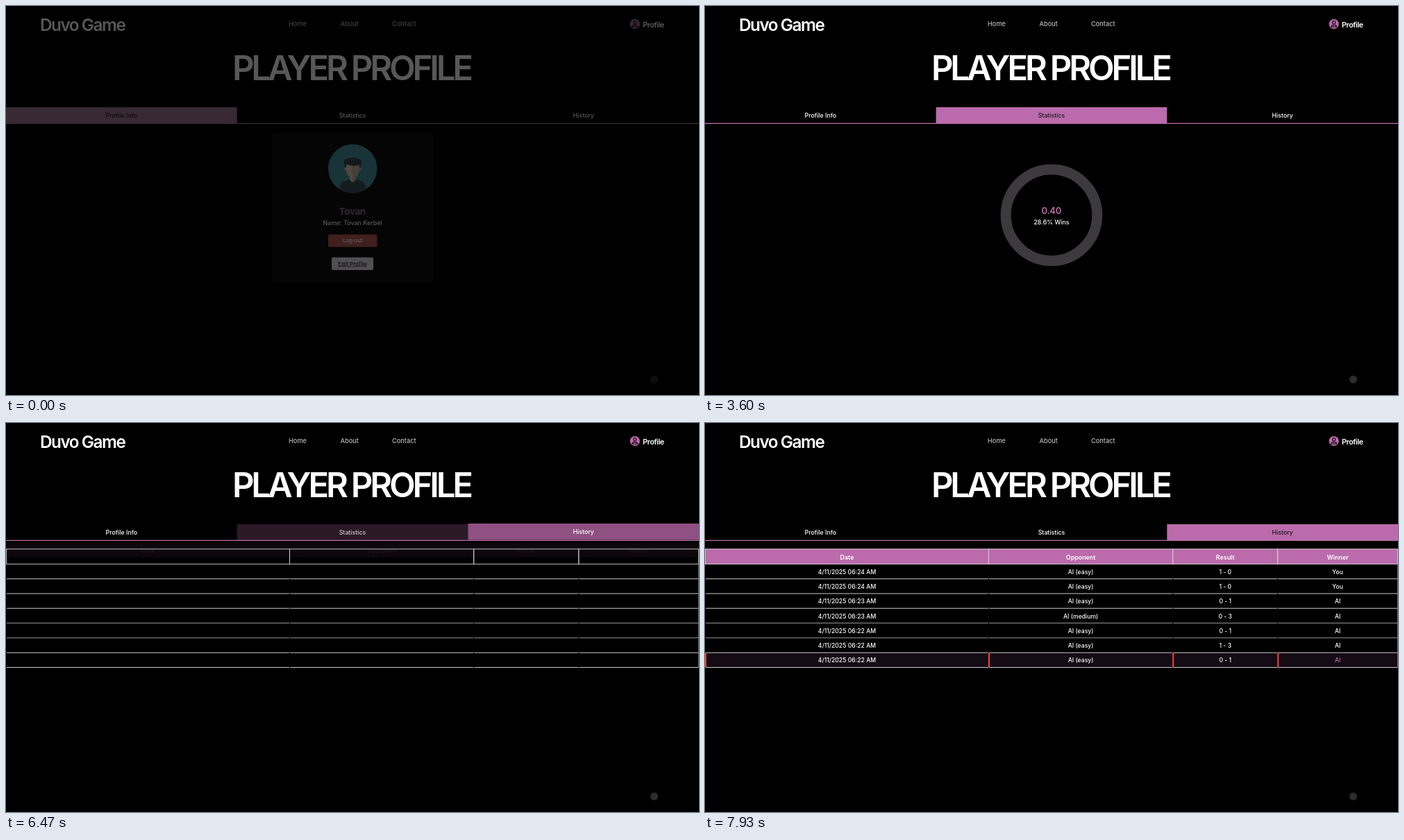
Recreate the animation shown at these times as an HTML page with a canvas. Size 998 by 561 pixels, loop 8 s.

```html
<!DOCTYPE html>
<html lang="en">
<head>
<meta charset="utf-8">
<title>Player profile</title>
<style>
html, body { margin: 0; width: 100%; height: 100%; overflow: hidden; background: #000; }
canvas { display: block; width: 998px; height: 561px; }
</style>
</head>
<body>
<canvas id="stage"></canvas>
<script>
const W = 998, H = 561, LOOP = 8000;
const PINK = '#bb6bab', RED = '#f54338', GREEN = '#4caf50', WHITE = '#fff';
const canvas = document.getElementById('stage');
const c = canvas.getContext('2d');
const dpr = window.devicePixelRatio || 1;
canvas.width = W * dpr;
canvas.height = H * dpr;

const STATS_AT = 2505, HISTORY_AT = 6262;
const TABS = ['Profile Info', 'Statistics', 'History'];
const COLS = [0.5, 408.5, 673.7, 824.8, 997.5];
const HEADS = ['Date', 'Opponent', 'Result', 'Winner'];
const GAMES = [
  ['24', 'easy', '1 - 0'], ['24', 'easy', '1 - 0'], ['23', 'easy', '0 - 1'],
  ['23', 'medium', '0 - 3'], ['22', 'easy', '0 - 1'], ['22', 'easy', '1 - 3'],
  ['22', 'easy', '0 - 1']
];
const TOP = 203.4, ROW = 21.3;

const clamp = x => Math.max(0, Math.min(1, x));
const ramp = (t, start, len) => clamp((t - start) / len);
const mix = (a, b, k) => a + (b - a) * k;
const out2 = p => 1 - (1 - p) * (1 - p);
const hold = (t, on, off, len) => Math.min(ramp(t, on, len), 1 - ramp(t, off, len));

// cubic-bezier(.25, .1, .25, 1)
function ease(x) {
  if (x <= 0 || x >= 1) return clamp(x);
  let lo = 0, hi = 1, u;
  for (let i = 0; i < 20; i++) {
    u = (lo + hi) / 2;
    const bx = 0.75 * u * (1 - u) + u * u * u;
    if (bx < x) lo = u; else hi = u;
  }
  return 0.3 * u * (1 - u) * (1 - u) + 3 * u * u * (1 - u) + u * u * u;
}

function text(s, x, y, size, o = {}) {
  c.font = `${o.weight || 500} ${size}px Inter, "Open Sans", sans-serif`;
  c.letterSpacing = (o.track || 0) * size + 'px';
  c.textAlign = o.align || 'center';
  c.fillStyle = o.color || WHITE;
  c.fillText(s, x, y + size * 0.364);
}

function box(x, y, w, h, color, r = 0) {
  c.fillStyle = color;
  c.beginPath();
  c.roundRect(x, y, w, h, r);
  c.fill();
}

function disc(x, y, r, color) {
  c.fillStyle = color;
  c.beginPath();
  c.arc(x, y, r, 0, Math.PI * 2);
  c.fill();
}

function shape(d, color) {
  c.fillStyle = color;
  c.fill(new Path2D(d));
}

function faded(alpha, dy, draw) {
  if (alpha <= 0) return;
  c.save();
  c.globalAlpha *= alpha;
  c.translate(0, dy);
  draw();
  c.restore();
}

function header() {
  text('Duvo Game', 49, 27.4, 24.3, { align: 'left', weight: 600, track: -0.06 });
  text('Home', 420, 25.5, 9.2, { color: '#b9b9b9' });
  text('About', 494.7, 25.5, 9.2, { color: '#b9b9b9' });
  text('Contact', 573.3, 25.5, 9.2, { color: '#b9b9b9' });
  disc(905.7, 26, 7.1, PINK);
  c.strokeStyle = '#1c0f1a';
  c.lineWidth = 1.2;
  c.beginPath();
  c.arc(905.7, 23.8, 2.1, 0, Math.PI * 2);
  c.stroke();
  c.stroke(new Path2D('M901.8 30.2 Q902 27.6 904 27.6 H907.4 Q909.4 27.6 909.6 30.2 Z'));
  text('Profile', 917, 27.2, 10.9, { align: 'left', weight: 600, track: -0.045 });
  text('PLAYER PROFILE', 497.3, 89.2, 49, { weight: 600, track: -0.085 });
  disc(933.5, 538.5, 5.5, '#2c2c2c');
}

function tabs(t) {
  const a = ease(ramp(t, STATS_AT, 450)), b = ease(ramp(t, HISTORY_AT, 450));
  const active = [1 - a, a * (1 - b), b];
  const hover = [0, hold(t, 960, 2950, 110), hold(t, 4950, 6520, 150)];
  box(0, 168.8, W, 1.1, PINK);
  TABS.forEach((label, i) => {
    const w = W / 3, up = -hover[i];
    faded(active[i], up, () => box(i * w, 146, w, 23.6, PINK));
    const v = Math.round(mix(255, 28, active[i] * (1 - hover[i])));
    text(label, (i + 0.5) * w, 157.9 + up, 8.8, { color: `rgb(${v},${v},${v})` });
  });
}

function avatar() {
  c.save();
  c.beginPath();
  c.arc(499.2, 234.5, 35.2, 0, Math.PI * 2);
  c.clip();
  box(463, 199, 73, 72, '#16aec2');
  shape('M480.5 271 V261 Q481 254 488 252.5 L495 250 H504 L511 252.5 Q517.5 254 518 261 V271 Z', '#33566d');
  shape('M494.8 243 H503.8 V250 Q499.3 258 494.8 250 Z', '#f2cba5');
  shape('M499.3 246 L503.8 244 V250 Q501.5 254 499.3 254 Z', '#dcae87');
  disc(489.2, 235, 2, '#f2cba5');
  disc(509.6, 235, 2, '#dcae87');
  shape('M489.5 226 H499.4 V248 Q489.5 246 489.5 234 Z', '#f4d0ab');
  shape('M499.4 226 H509.2 V234 Q509.2 246 499.4 248 Z', '#e3b68f');
  shape('M488.7 234 Q486.5 226 487 221.5 Q493 218.5 500 218.7 Q508 218.8 512 222.5 Q511.8 229 509.9 234.5 L508 229 Q499 232.5 491 228 Z', '#34495e');
  c.restore();
}

function card() {
  box(382, 181.8, 234, 216.4, '#100d10', 6);
  avatar();
  text('Tovan', 498.8, 296.3, 13.6, { color: PINK, weight: 600, track: -0.03 });
  text('Name: Tovan Kerbel', 499, 312.7, 8.85);
  box(464, 329.4, 70.5, 18.2, RED, 2);
  text('Log out', 499.2, 338.5, 7.9, { weight: 600 });
  box(469, 362.5, 60, 18.3, '#ececee', 2);
  text('Edit Profile', 499, 371.7, 8, { weight: 600, color: '#4c1f62' });
  box(478.5, 375.4, 41, 0.8, '#4c1f62');
}

function arc(from, to, color) {
  if (to <= from) return;
  c.strokeStyle = color;
  c.lineWidth = 15;
  c.beginPath();
  c.arc(499, 301.6, 65.8, (from - 0.25) * Math.PI * 2, (to - 0.25) * Math.PI * 2);
  c.stroke();
}

function chart(t) {
  const wins = 2 / 7;
  faded(ramp(t, 2850, 850), 0, () => arc(0, 1, '#444244'));
  arc(0, wins * out2(ramp(t, 3775, 2000)), GREEN);
  arc(wins, wins + (1 - wins) * out2(ramp(t, 3975, 2000)), RED);
  faded(out2(ramp(t, 2950, 700)), 0, () => {
    text('0.40', 498.8, 295.2, 13.2, { color: PINK, weight: 600, track: -0.03 });
    text('28.6% Wins', 499, 311.8, 8.85);
  });
  const k = out2(ramp(t, 4000, 800));
  faded(k, 10.4 * (1 - k), () => {
    box(459.5, 387, 9, 8.7, PINK, 2);
    text('Losses', 471.2, 391.8, 7.75, { align: 'left' });
    box(508.2, 387, 9, 8.7, WHITE, 2);
    text('Wins', 520, 391.8, 7.75, { align: 'left' });
  });
}

const mid = i => (COLS[i] + COLS[i + 1]) / 2;

function grid() {
  c.strokeStyle = '#d8d0d6';
  c.lineWidth = 0.9;
  for (let i = 0; i < 4; i++) {
    const x = COLS[i], w = COLS[i + 1] - x;
    c.strokeRect(x, 181.8, w, TOP - 181.8);
    for (let r = 1; r <= GAMES.length; r++) box(x + 0.5, TOP + r * ROW - 0.45, w - 1, 0.9, '#c9c9c9');
  }
  box(997, TOP, 0.8, ROW * GAMES.length, '#9a9a9a');
}

function history(t) {
  const h = out2(ramp(t, 6455, 450));
  faded(h, -10.4 * (1 - h), () => {
    box(0.5, 181.8, 997, TOP - 181.8, PINK);
    HEADS.forEach((s, i) => text(s, mid(i), 193.4, 8.9, { weight: 600 }));
  });
  GAMES.forEach(([min, level, score], r) => {
    const k = out2(ramp(t, 6625 + 100 * r, 500));
    const on = 6830 + 135 * r, off = r === GAMES.length - 1 ? LOOP * 2 : on + 135;
    const won = score === '1 - 0', hovered = t >= on && t < off;
    const y = TOP + r * ROW;
    if (hovered) faded(k, 0, () => box(0.5, y, 997, ROW, '#150b14'));
    const edge = Math.min(ramp(t, on, 250), 1 - ramp(t, off, 150));
    faded(edge * k, 0, () => {
      for (let i = 0; i < 4; i++) box(COLS[i] - 0.5, y + 0.5, 2, ROW - 1, won ? GREEN : RED);
    });
    faded(k, 10.4 * (1 - k) - (hovered ? 0.6 : 0), () => {
      const cells = [`4/11/2025 06:${min} AM`, `AI (${level})`, score, won ? 'You' : 'AI'];
      cells.forEach((s, i) => text(s, mid(i), y + 11.3, 8.65, { color: i === 3 && hovered ? PINK : WHITE }));
    });
  });
  grid();
}

// Opening fade: colours start muted and dark.
function fadeIn(t) {
  const k = 1 - ramp(t, 20, 640);
  if (k <= 0) return;
  c.globalCompositeOperation = 'saturation';
  box(0, 0, W, H, `rgba(128,128,128,${0.45 * k})`);
  c.globalCompositeOperation = 'source-over';
  box(0, 0, W, H, `rgba(0,0,0,${0.66 * k})`);
}

function draw(t) {
  c.setTransform(dpr, 0, 0, dpr, 0, 0);
  c.fillStyle = '#000';
  c.fillRect(0, 0, W, H);
  header();
  tabs(t);
  if (t < STATS_AT) card();
  else if (t < HISTORY_AT) chart(t);
  else history(t);
  fadeIn(t);
}

const start = performance.now();
function tick() {
  draw((performance.now() - start) % LOOP);
  requestAnimationFrame(tick);
}
tick();
</script>
</body>
</html>
```
